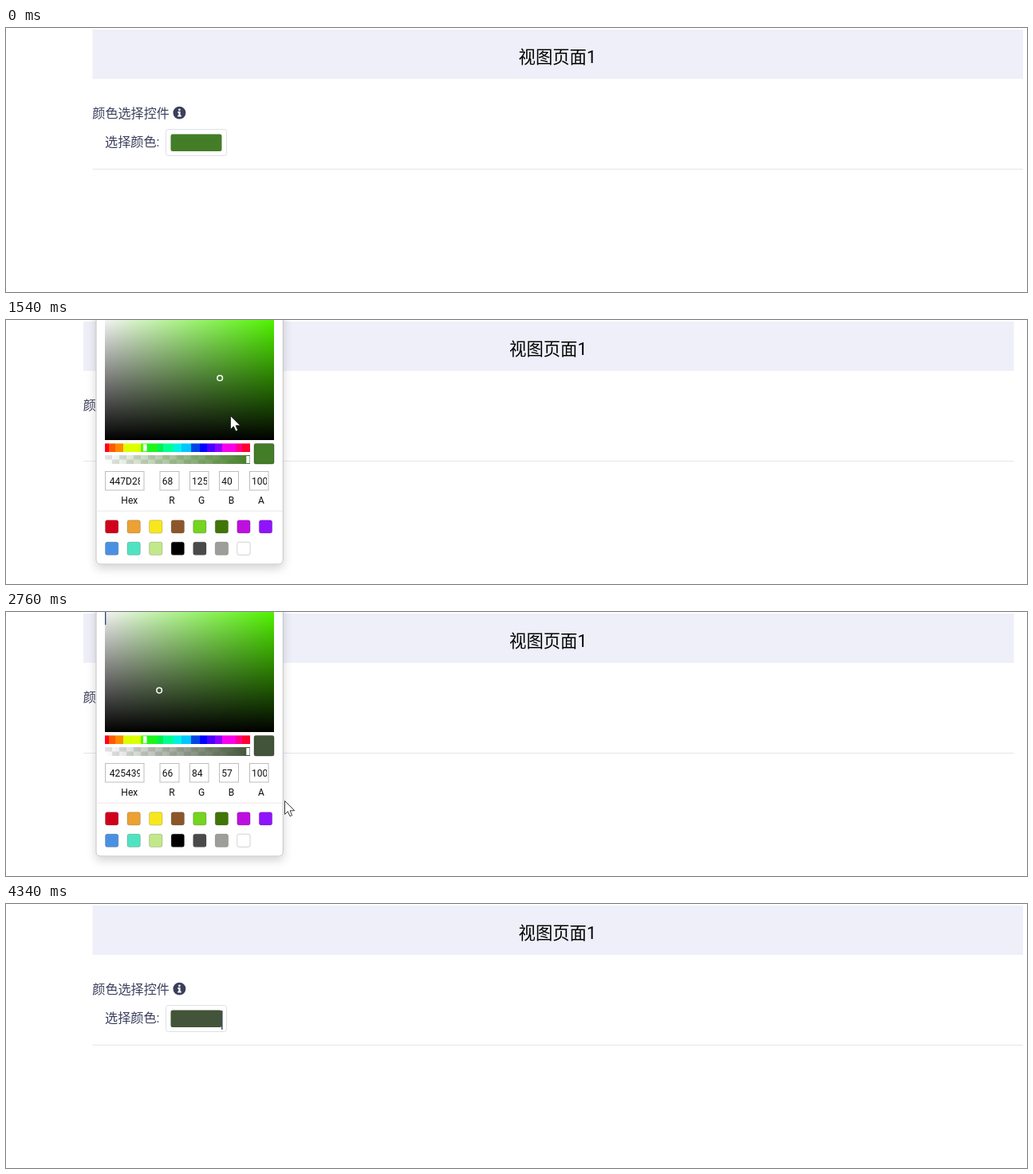
Write an HTML page that moves like this. It is 1280x332 px and loops after 4.48 s.

```html
<!DOCTYPE html>
<html lang="zh-CN">
<head>
<meta charset="utf-8">
<title>颜色选择控件</title>
<style>
html, body { margin: 0; width: 100%; height: 100%; overflow: hidden; background: #fff; }
svg { display: block; width: 1280px; height: 332px; }
text { font-family: Roboto, "Noto Sans CJK SC", "Noto Sans CJK", sans-serif; white-space: pre; }
#popup text { font-size: 12px; fill: #111; }
</style>
</head>
<body>
<svg viewBox="0 0 1280 332" xmlns="http://www.w3.org/2000/svg">
  <defs>
    <linearGradient id="sat"><stop stop-color="#fff"/><stop id="pure" offset="1"/></linearGradient>
    <linearGradient id="val" x2="0" y2="1"><stop stop-color="#000" stop-opacity="0"/><stop offset="1"/></linearGradient>
    <linearGradient id="alpha"><stop id="a0" stop-opacity="0"/><stop id="a1" offset="1"/></linearGradient>
    <pattern id="check" x="124" y="170" width="18" height="11" patternUnits="userSpaceOnUse">
      <rect width="18" height="11" fill="#fff"/>
      <path d="M0 0h9v5.5h-9zM9 5.5h9v5.5h-9z" fill="#e3e3e3"/>
    </pattern>
    <filter id="shadow" x="-20%" y="-10%" width="140%" height="120%">
      <feDropShadow dx="0" dy="5" stdDeviation="6" flood-color="#000" flood-opacity=".17"/>
    </filter>
  </defs>

  <g id="page">
    <rect x="108.5" y="2" width="1166.5" height="62" fill="#eeeff8"/>
    <text x="642.6" y="44" font-size="21.35" fill="#000">视图页面1</text>
    <g fill="#3b3f5c">
      <text x="108.3" y="112.7" font-size="16.1">颜色选择控件</text>
      <text x="124" y="149" font-size="16.15">选择颜色:</text>
      <circle cx="217.4" cy="106.7" r="7.9"/>
    </g>
    <path d="M215.3 105.1h3.3v4.7h1.2v1.6h-4.6v-1.6h1.2v-3.1h-1.1z" fill="#fff"/>
    <circle cx="217.4" cy="102.8" r="1.4" fill="#fff"/>
    <rect x="200.5" y="127.5" width="76" height="33" rx="3" fill="#fff" stroke="#dfe0e6"/>
    <rect id="field" x="206.5" y="133.5" width="64" height="21.5" rx="2.5"/>
    <rect id="caret" y="134" width="1.3" height="24" fill="#2b3050"/>
    <path d="M108.5 177.5H1275" stroke="#e6e6e9"/>
  </g>

  <g id="popup">
    <rect x="113" y="-60" width="234.3" height="367" rx="5" fill="#fff" stroke="#c3c3c3" filter="url(#shadow)"/>
    <rect x="124" y="-8" width="212" height="159" fill="url(#sat)"/>
    <rect x="124" y="-8" width="212" height="159" fill="url(#val)"/>
    <rect id="popCaret" x="124" y="0" width="1.3" height="16" fill="#27496b"/>
    <circle id="marker" r="3.3" fill="none" stroke="#fff" stroke-width="1.5"/>
    <g id="hues"></g>
    <rect x="172" y="156.3" width="4.6" height="8.7" rx=".8" fill="#fff"/>
    <rect x="124" y="170" width="182" height="11" fill="url(#check)"/>
    <rect x="124" y="170" width="182" height="11" fill="url(#alpha)"/>
    <rect x="301.3" y="171" width="4.2" height="9" fill="#fff"/>
    <rect id="swatch" x="311" y="155.5" width="25" height="25.5" rx="2" stroke="#000" stroke-opacity=".3"/>
    <g id="inputs"></g>
    <path d="M113.5 240.2H347" stroke="#e9e9e9"/>
    <g id="presets"></g>
  </g>

  <path id="cursor" d="M.5 .5V17.5L4.3 13.8L7 19.8L9.6 18.7L7.1 12.8H12.7Z" fill="#fff" stroke="#222" stroke-width=".9" stroke-linejoin="round"/>
</svg>
<script>
const LOOP = 4480, TICK = 67.5, OPEN = 1205, CLOSE = 3185;
const NS = 'http://www.w3.org/2000/svg';
const $ = id => document.getElementById(id);

function add(parent, tag, attrs, text) {
  const el = document.createElementNS(NS, tag);
  set(el, attrs);
  if (text) el.textContent = text;
  parent.appendChild(el);
  return el;
}
function set(el, attrs) {
  for (const k in attrs) el.setAttribute(k, attrs[k]);
}
const show = (el, on) => set(el, { visibility: on ? 'visible' : 'hidden' });
const clamp = v => Math.max(0, Math.min(1, v));

// Stepped hue strip: left edge and fill of each band
const bands = [[124, '#ff0022'], [129, '#ff5a00'], [137, '#ff8a00'], [147, '#deff00'],
  [169, '#4cff00'], [176, '#1cf51c'], [190, '#00f050'], [197, '#00ff90'], [210, '#00f0e4'],
  [220, '#00c8ff'], [232, '#0046e6'], [243, '#0000ff'], [252, '#4a00ff'], [262, '#8c00ff'],
  [271, '#f800ea'], [288, '#ff0088'], [296, '#ff0030']];
bands.forEach(([x, fill], i) => {
  const end = i + 1 < bands.length ? bands[i + 1][0] : 306;
  add($('hues'), 'rect', { x, y: 155.3, width: end - x, height: 10.7, fill });
});

// Labelled inputs: name, left edge, width, label centre, text inset
const boxes = [['Hex', 124.5, 48.5, 154.8, 5.3], ['R', 193, 24, 208, 2.8],
  ['G', 230.5, 23.5, 245.2, 2.5], ['B', 267.5, 24, 282.6, 2.8], ['A', 305.5, 23.5, 320, 2.5]];
const values = boxes.map(([name, x, w, mid, pad], i) => {
  const g = $('inputs');
  add(g, 'rect', { x, y: 190.5, width: w, height: 23.5, fill: '#fff', stroke: '#bdbdbd' });
  add(g, 'text', { x: mid, y: 231, 'text-anchor': 'middle' }, name);
  const clip = add(g, 'clipPath', { id: 'clip' + i });
  add(clip, 'rect', { x, y: 191, width: w - (i ? 2 : 5), height: 23 });
  return add(g, 'text', { x: x + pad, y: 207, 'clip-path': `url(#clip${i})` });
});

'd0021b eca133 f8e71c 8b572a 74d41f 417505 bd10e0 9013fe 4a90e2 50e3c2 c2e88a 000000 4a4a4a 9d9d99 ffffff'
  .split(' ').forEach((hex, i) => add($('presets'), 'rect', {
    x: 124.5 + 27.55 * (i % 8), y: i < 8 ? 251.8 : 279.3, width: 16.3, height: 16.3, rx: 2.5,
    fill: '#' + hex, stroke: '#000', 'stroke-opacity': .18
  }));

// Chosen colours: start time, red, green, blue
const picks = [[0, 68, 125, 40], [1670, 45, 95, 21], [2210, 66, 84, 57]];

// Pointer route: time, x, y
const route = [[120, 1070, 306], [255, 800, 235], [390, 520, 150], [525, 345, 119], [590, 289, 141],
  [660, 262, 153], [790, 232, 151], [925, 239, 149], [1205, 239, 149], [1335, 262, 135],
  [1470, 281, 120], [1600, 281, 120], [1670, 289, 92], [1800, 289, 92], [1940, 240, 95],
  [2010, 218, 96], [2145, 192, 98], [2280, 192, 98], [2415, 240, 140], [2550, 325, 210],
  [2620, 344, 230], [2750, 348, 237], [2820, 370, 241], [2955, 460, 252], [3090, 509, 255],
  [3525, 509, 255], [3590, 660, 270], [3660, 830, 284], [3730, 940, 295], [3800, 1009, 317], [3870, 1060, 345]];

function pointer(t) {
  let i = 1;
  while (i < route.length - 1 && route[i][0] < t) i++;
  const [t0, x0, y0] = route[i - 1], [t1, x1, y1] = route[i];
  const k = clamp((t - t0) / (t1 - t0));
  return [x0 + (x1 - x0) * k, y0 + (y1 - y0) * k].map(Math.round);
}

function render(ms) {
  const now = ms % LOOP;
  const t = now < 120 ? 0 : 120 + Math.floor((now - 119) / TICK) * TICK;

  const [, r, g, b] = picks.filter(p => p[0] <= t).pop();
  const color = `rgb(${r},${g},${b})`;
  const hex = [r, g, b].map(v => v.toString(16).padStart(2, '0')).join('').toUpperCase();
  const max = Math.max(r, g, b), min = Math.min(r, g, b);
  const hue = 120 + 60 * (b - r) / (max - min);

  set($('page'), { transform: `translate(${t >= OPEN && t < 3260 ? -11.5 : 0})` });
  set($('field'), { fill: color });
  const early = t >= 1060 && t < OPEN;
  const late = t >= 3325 && t < 3865 || now >= 4340;
  show($('caret'), early || late);
  set($('caret'), { x: early ? 206.7 : 270.2 });

  const opacity = clamp((t - OPEN + 70) / 140) * clamp(1 - (t - CLOSE + 70) / 140);
  set($('popup'), { opacity });
  show($('popup'), t >= OPEN && opacity > 0);
  set($('popCaret'), { opacity: t >= 1670 && t < 2800 ? 1 : 0 });
  set($('marker'), { cx: 124 + 212 * (1 - min / max), cy: 151 - 159 * max / 255 });
  set($('pure'), { 'stop-color': `hsl(${hue},100%,50%)` });
  for (const id of ['a0', 'a1']) set($(id), { 'stop-color': color });
  set($('swatch'), { fill: color });
  [hex, r, g, b, 100].forEach((v, i) => values[i].textContent = v);

  const [x, y] = pointer(t);
  set($('cursor'), { transform: `translate(${x} ${y})` });
  show($('cursor'), t >= 120 && t < 3870);
}

const start = performance.now();
function frame() {
  render(performance.now() - start);
  requestAnimationFrame(frame);
}
render(0);
requestAnimationFrame(frame);
</script>
</body>
</html>
```
